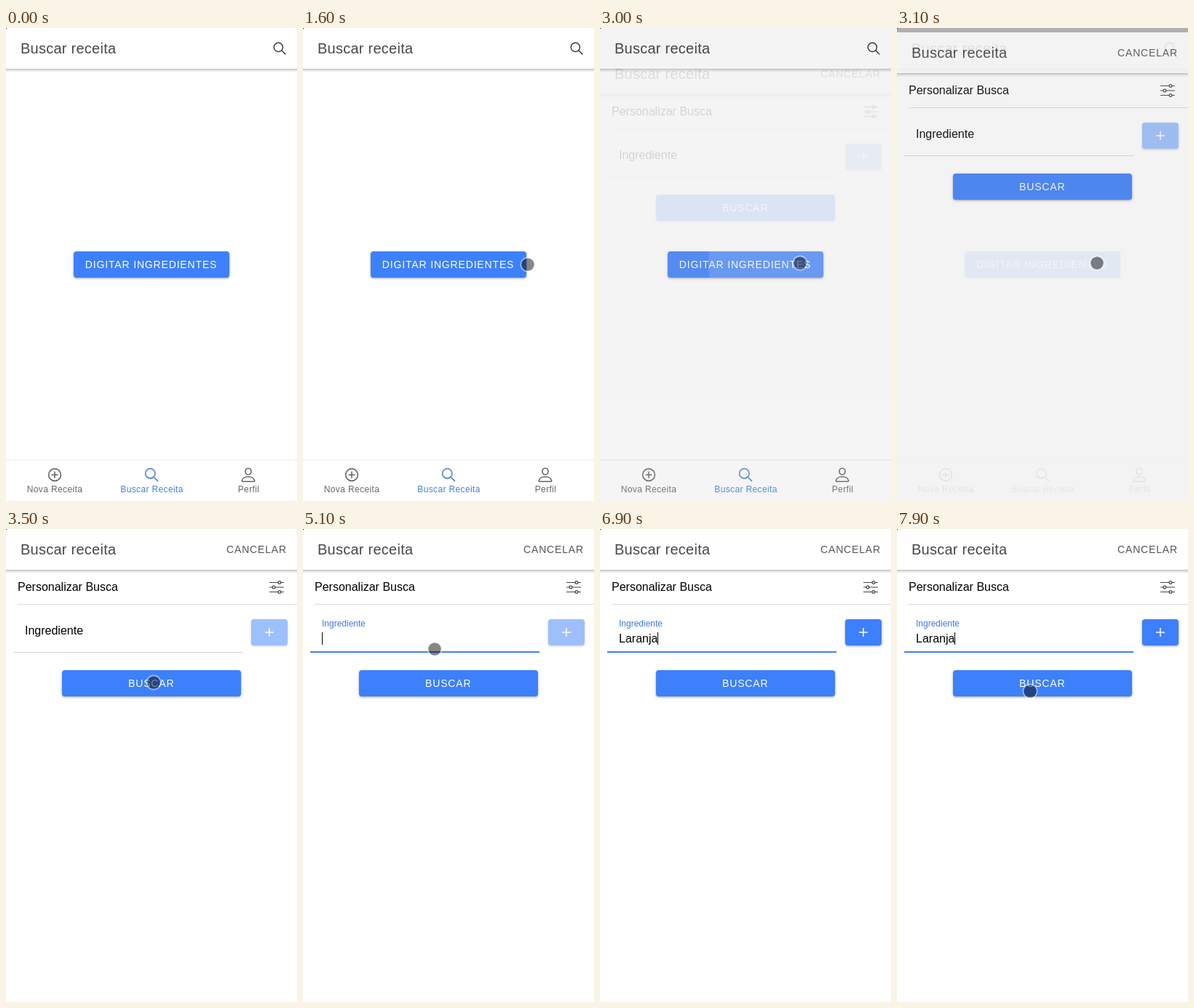
These frames come from a looping animation (400x650 px, 8 s). An HTML page:

```html
<!DOCTYPE html>
<html lang="pt-BR">
<head>
<meta charset="utf-8">
<title>Buscar receita</title>
<style>
  html, body { margin: 0; width: 100%; height: 100%; overflow: hidden; background: #fff; }
  svg { display: block; font-family: "Liberation Sans", Arial, sans-serif; }
  text { white-space: pre; }
  .title { font-size: 20px; letter-spacing: .25px; fill: #484848; }
  .caps { font-size: 14px; letter-spacing: .84px; fill: #fff; }
  .body { font-size: 16px; }
  .tab { font-size: 12px; letter-spacing: .36px; fill: #666; text-anchor: middle; }
  .button { fill: #3d80fb; filter: drop-shadow(0 1px 1px rgba(0,0,0,.28)) drop-shadow(0 1px 2px rgba(0,0,0,.14)); }
  .icon { fill: none; stroke: #666; stroke-width: 1.6; stroke-linecap: round; stroke-linejoin: round; }
</style>
</head>
<body>
<svg width="400" height="650" viewBox="0 0 400 650">
  <defs>
    <linearGradient id="shade" x2="0" y2="1">
      <stop stop-opacity=".27"/><stop offset=".4" stop-opacity=".12"/><stop offset="1" stop-opacity="0"/>
    </linearGradient>
    <clipPath id="buttonClip"><rect x="93" y="307" width="214" height="36" rx="4"/></clipPath>
    <g id="header">
      <rect width="400" height="56" fill="#fff"/>
      <rect y="56" width="400" height="5" fill="url(#shade)"/>
      <text class="title" x="20" y="35">Buscar receita</text>
    </g>
  </defs>

  <g id="home">
    <rect width="400" height="650" fill="#fff"/>
    <use href="#header"/>
    <g class="icon" style="stroke:#3c3c3c;stroke-width:1.5"><circle cx="374.4" cy="26.4" r="6.1"/><path d="M379 31l5 5"/></g>
    <rect class="button" x="93" y="307" width="214" height="36" rx="4"/>
    <circle id="ripple" cx="275" cy="323" fill="#fff" opacity=".14" clip-path="url(#buttonClip)"/>
    <text class="caps" x="108.8" y="330">DIGITAR INGREDIENTES</text>
    <path d="M0 593.5h400" stroke="#ebebeb"/>
    <g class="icon"><circle cx="67" cy="614" r="8.4"/><path d="M63 614h8M67 610v8"/></g>
    <g class="icon" style="stroke:#4580dc"><circle cx="198.3" cy="612.2" r="6.7"/><path d="M203.3 617.2l5.2 5.2"/></g>
    <path class="icon" d="M333 605c2.600 0 4.200 2 4 4.500s-1.900 4.300-4 4.300-3.800-1.800-4-4.300 1.400-4.500 4-4.500zM333 616.500c-4 0-8 2-8.700 5.500-.1.700.2 1.200.9 1.200h15.600c.7 0 1-.5.900-1.200-.7-3.500-4.700-5.500-8.700-5.500z"/>
    <text class="tab" x="67" y="638">Nova Receita</text>
    <text class="tab" x="200.500" y="638" style="fill:#4580dc">Buscar Receita</text>
    <text class="tab" x="333.500" y="638">Perfil</text>
  </g>

  <rect id="backdrop" width="400" height="650"/>

  <g id="modal">
    <rect width="400" height="650" fill="#fff"/>
    <use href="#header"/>
    <text class="caps" x="303" y="33" style="fill:#555">CANCELAR</text>
    <text class="body" x="16" y="85">Personalizar Busca</text>
    <g class="icon" style="stroke:#444;stroke-width:1.2">
      <path d="M362.500 73.500H374M378 73.500h3.500M362.500 80H366M370 80h11.500M362.500 86.500H374M378 86.500h3.500"/>
      <circle cx="376" cy="73.500" r="1.900"/><circle cx="368" cy="80" r="1.900"/><circle cx="376" cy="86.500" r="1.900"/>
    </g>
    <path d="M16 103.500h384" stroke="#dcdcdc"/>
    <text id="label" x="26">Ingrediente</text>
    <path id="underline"/>
    <text id="field" class="body" x="26" y="156"></text>
    <path id="caret" stroke="#000"/>
    <g id="add">
      <rect class="button" x="337" y="124" width="50" height="36" rx="4"/>
      <path d="M356 142h12M362 136v12" stroke="#fff" stroke-width="1.500"/>
    </g>
    <rect class="button" x="77" y="194" width="246" height="36" rx="4"/>
    <text class="caps" x="168" y="217">BUSCAR</text>
  </g>

  <g id="cursor">
    <circle r="9.600" fill="none" stroke="#fff" stroke-width="2" opacity=".45"/>
    <circle r="8.800" opacity=".47"/>
  </g>
  <rect width="1" height="1"/>
</svg>
<script>
const LOOP = 8000, STEP = 100;
const OPEN = 2900, FOCUS = 4000;
const WORD = 'Laranja';
const KEYS = [5900, 6100, 6200, 6400, 6500, 6700, 6800];

// Pointer paths: [time, x, y]; the pointer is hidden between them.
const PATHS = [
  [[1500, 369, 332], [1600, 309, 325], [1800, 275, 323], [3200, 275, 323], [3500, 203, 211],
   [3900, 186, 152], [4800, 186, 152], [5100, 181, 165], [5800, 181, 165]],
  [[7400, 181, 165], [7800, 183, 223], [8000, 183, 223]]
];

const $ = id => document.getElementById(id);
const set = (id, attrs) => {
  for (const name in attrs) $(id).setAttribute(name, attrs[name]);
};
const clamp = v => Math.min(1, Math.max(0, v));
const mix = (a, b, p) => a + (b - a) * p;
const smooth = p => p * p * (3 - 2 * p);

function pointerAt(t) {
  const path = PATHS.find(p => t >= p[0][0] && t < p.at(-1)[0]);
  if (!path) return null;
  const i = path.findIndex(k => k[0] > t);
  const [a, b] = [path[i - 1], path[i]];
  const p = smooth((t - a[0]) / (b[0] - a[0]));
  return [mix(a[1], b[1], p), mix(a[2], b[2], p)];
}

function openAmount(t) {
  const p = (t - OPEN) / STEP;
  return p <= 0 ? 0 : p < 2 ? mix(0, .125, p) + .6 * Math.max(0, p - 1) : 1 - .15 * clamp(3 - p);
}

function draw(t) {
  const open = openAmount(t);
  set('ripple', { r: t < OPEN ? 0 : 60 + (t - OPEN) * .66 });
  set('backdrop', { opacity: Math.min(.32, open * .37) });
  set('modal', { opacity: open, transform: `translate(0 ${40 * (1 - open)})` });

  const focused = t >= FOCUS;
  const lift = clamp((t - FOCUS) / 150);
  set('label', { y: mix(145, 134, lift), 'font-size': mix(16, 12, lift), fill: focused ? '#3f79dc' : '#000' });
  set('underline', focused
    ? { d: 'M10 169h315', stroke: '#3d80fb', 'stroke-width': 2 }
    : { d: 'M10 169.500h315', stroke: '#d8d8d8', 'stroke-width': 1 });

  const typed = KEYS.filter(k => k <= t).length;
  $('field').textContent = WORD.slice(0, typed);
  const x = Math.floor(26 + (typed ? $('field').getComputedTextLength() : 0)) + .5;
  const since = t - (typed ? KEYS[typed - 1] : FOCUS);
  set('caret', { d: `M${x} 142v17`, opacity: focused && since % 1000 < 500 ? 1 : 0 });
  set('add', { opacity: typed ? 1 : .5 });

  const at = pointerAt(t);
  set('cursor', { opacity: at ? 1 : 0, transform: `translate(${at || '0,0'})` });
}

function tick() {
  draw(Math.floor(performance.now() % LOOP / STEP) * STEP);
  requestAnimationFrame(tick);
}
tick();
</script>
</body>
</html>
```
